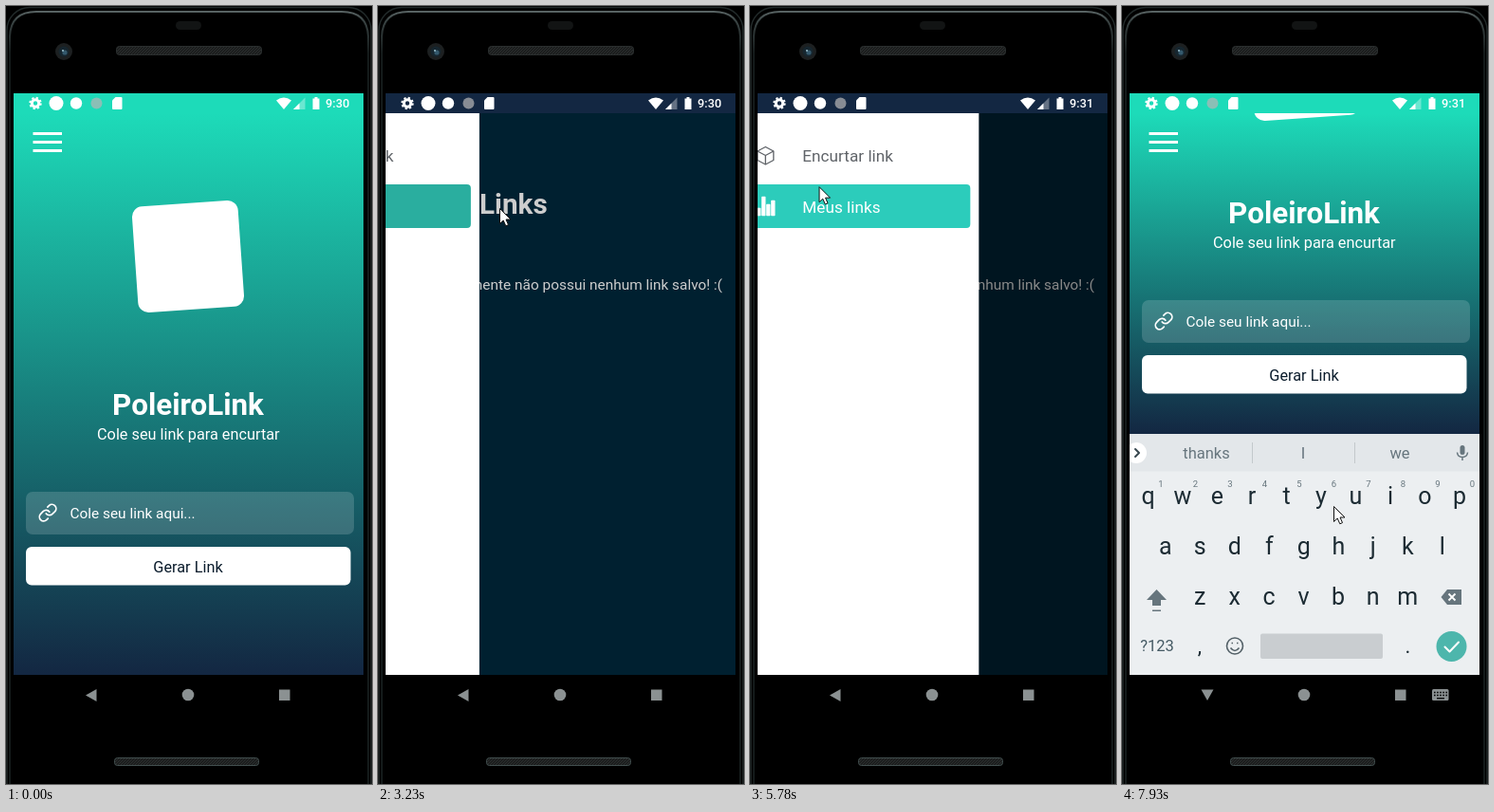
Recreate the animation shown at these times as an HTML page. Size 386 px wide and 820 px high, loop 8000 ms.

```html
<!DOCTYPE html>
<html lang="pt-BR">
<head>
<meta charset="utf-8">
<title>Encurtador de links</title>
<style>
  html, body { margin: 0; width: 100%; height: 100%; overflow: hidden; background: #000; }
  svg { display: block; font-family: Roboto, sans-serif; }
  .mid { text-anchor: middle; }
  .line { fill: none; stroke: #fff; stroke-width: 2; stroke-linecap: round; stroke-linejoin: round; }
  .item rect { fill: none; }
  .item text { font-size: 17.2px; fill: #5f6368; }
  .item path { fill: none; stroke: #5f6368; stroke-width: 1.3; stroke-linejoin: round; }
  .item.active rect { fill: #2cccbb; }
  .item.active.pressed rect { fill: #2aae9f; }
  .item.active text { fill: #fff; }
  .item.active path { fill: #fff; stroke: #fff; }
  #cubeEdges { fill: none !important; }
  .active #cubeEdges { stroke: #2cccbb; }
</style>
</head>
<body>
<svg width="386" height="820" viewBox="0 0 386 820">
  <defs>
    <linearGradient id="sky" gradientUnits="userSpaceOnUse" x1="0" y1="113" x2="0" y2="704">
      <stop stop-color="#1ddbb9"/><stop offset="1" stop-color="#132742"/>
    </linearGradient>
    <linearGradient id="rim" gradientUnits="userSpaceOnUse" x1="0" y1="0" x2="0" y2="50">
      <stop stop-color="#6b7676"/><stop offset=".3" stop-color="#3a4444"/><stop offset="1" stop-color="#141a1a"/>
    </linearGradient>
    <pattern id="mesh" width="3" height="3" patternUnits="userSpaceOnUse">
      <rect width="3" height="3" fill="#1b1d1d"/><path d="M0 3L3 0" stroke="#303434" stroke-width=".8"/>
    </pattern>
    <clipPath id="app"><rect x="8" y="113" width="369" height="592"/></clipPath>
  </defs>

  <!-- phone body -->
  <rect width="386" height="820"/>
  <rect x="1" y="1.500" width="384" height="860" rx="24" fill="none" stroke="#222a2a" stroke-width="1.500"/>
  <path d="M4 820V32Q5 6 32 6H354Q381 6 382 32V820" fill="none" stroke="url(#rim)" stroke-width="2"/>
  <rect x="179" y="16" width="27" height="9" rx="4.500" fill="#121414"/>
  <circle cx="61" cy="48" r="9" fill="#1d2021"/>
  <circle cx="61" cy="48" r="5.500" fill="#16262f"/>
  <circle cx="62" cy="49" r="2.600" fill="#34596d"/>
  <circle cx="60" cy="47" r="1" fill="#9ec4d2"/>
  <rect x="116.500" y="42.500" width="153" height="9" rx="3" fill="url(#mesh)" stroke="#2a2e2e"/>
  <rect x="114.500" y="792.500" width="152" height="8" rx="3" fill="url(#mesh)" stroke="#414e4e"/>

  <!-- status bar -->
  <rect id="status" x="8" y="92" width="369" height="21.500"/>
  <g fill="#fff">
    <circle cx="31" cy="102.500" r="3.700" fill="none" stroke="#fff" stroke-width="3"/>
    <circle cx="31" cy="102.500" r="5.600" fill="none" stroke="#fff" stroke-width="2.200" stroke-dasharray="2.200 2.200"/>
    <circle cx="53" cy="102.500" r="7.500"/>
    <circle cx="74" cy="102.500" r="6.200"/>
    <circle cx="95.500" cy="102.500" r="6" fill="#b4b4b4" opacity=".72"/>
    <path d="M115.500 96H121.500Q122.500 96 122.500 97V108Q122.500 109 121.500 109H113Q112 109 112 108V99.500Z"/>
    <path d="M293 109L285 99.500Q293 93.500 301 99.500Z"/>
    <path d="M303 109H315.500V96.500Z" opacity=".35"/>
    <path d="M303 109H309.500V102.500Z"/>
    <path d="M325.500 96H328.500V97.500H330.500V109H323.500V97.500H325.500Z"/>
    <text id="clock" x="337" y="107" font-size="12.800" font-weight="500"></text>
  </g>

  <g clip-path="url(#app)">
    <g id="home">
      <rect x="8" y="113" width="369" height="592" fill="url(#sky)"/>
      <g id="content">
        <rect id="badge" x="136" y="208" width="112" height="112" rx="11" fill="#fff" transform="rotate(-4 192 264)"/>
        <g class="mid" fill="#fff">
          <text x="192" y="431" font-size="31.400" font-weight="700">PoleiroLink</text>
          <text x="192.300" y="457" font-size="16.300">Cole seu link para encurtar</text>
        </g>
        <rect x="21" y="512" width="346" height="45" rx="7" fill="#fff" fill-opacity=".16"/>
        <path class="line" transform="translate(33.500 523.500) scale(.88)" d="M10 13a5 5 0 0 0 7.540.540l3-3a5 5 0 0 0-7.070-7.070l-1.720 1.710M14 11a5 5 0 0 0-7.540-.540l-3 3a5 5 0 0 0 7.070 7.070l1.710-1.710"/>
        <text x="67.500" y="540" font-size="15.400" fill="#fff">Cole seu link aqui...</text>
        <rect x="21" y="570" width="342.500" height="40.500" rx="6" fill="#fff"/>
        <text class="mid" x="192" y="597" font-size="16.300" fill="#0b1c2c">Gerar Link</text>
      </g>
    </g>
    <g id="links" fill="#fff">
      <rect id="linksPage" x="8" y="113" width="369" height="592"/>
      <text x="25.700" y="219" font-size="29.700" font-weight="700">Meus Links</text>
      <text x="17.500" y="298.500" font-size="15.420">Você infelismente não possui nenhum link salvo! :(</text>
    </g>
    <path d="M28.500 134.500H59M28.500 143.500H59M28.500 152.500H59" stroke="#fff" stroke-width="2.800"/>
    <rect id="shade" x="8" y="113" width="369" height="592"/>
    <g id="drawer">
      <rect x="8" y="113" width="251" height="592" fill="#fff"/>
      <g class="item" id="itemHome">
        <rect x="17" y="135" width="233" height="46" rx="4"/>
        <path d="M34 148.500L42.500 153V162.500L34 167L25.500 162.500V153Z"/>
        <path id="cubeEdges" d="M25.500 153L34 157.500L42.500 153M34 157.500V167"/>
        <text x="73" y="164">Encurtar link</text>
      </g>
      <g class="item" id="itemLinks">
        <rect x="17" y="188" width="233" height="46" rx="4"/>
        <path d="M25.500 213.500H28.500V220.500H25.500ZM30.500 201.500H33.500V220.500H30.500ZM35.500 209.500H38.500V220.500H35.500ZM40.500 205.500H43.500V220.500H40.500Z"/>
        <text x="73" y="217.500">Meus links</text>
      </g>
    </g>
    <g id="keyboard" fill="#1c2b33">
      <rect x="8" y="451" width="369" height="254" fill="#eceff1"/>
      <rect x="8" y="451" width="369" height="39.500" fill="#e3e7ea"/>
      <circle cx="15" cy="471" r="11" fill="#fff"/>
      <path class="line" style="stroke:#37474f" d="M14 467L18 471L14 475"/>
      <path d="M137.500 460V482M245.500 460V482" stroke="#c3c9cc"/>
      <g fill="#66757d">
        <rect x="356.500" y="463" width="5" height="10" rx="2.500"/>
        <path d="M353.500 470.500Q354 475.500 359 475.500T364.500 470.500M359 475.500V479" fill="none" stroke="#66757d" stroke-width="1.500"/>
        <path d="M36.500 615L47 626H41V632H32V626H26ZM32 636.500H41V638H32Z"/>
        <path d="M343 615H358V631H343L336.500 623Z"/>
        <path d="M344.500 619.500L351.500 626.500M351.500 619.500L344.500 626.500" stroke="#fff" stroke-width="1.800"/>
        <g fill="none" stroke="#546168" stroke-width="1.600">
          <circle cx="119" cy="674.500" r="8.500"/>
          <path d="M114.500 676.500Q119 682.500 123.500 676.500M115.500 671.500H117M121 671.500H122.500"/>
        </g>
      </g>
      <rect x="146" y="661.500" width="129" height="26.500" rx="2" fill="#c9cdd0"/>
      <circle cx="347.500" cy="675" r="16" fill="#4db6ac"/>
      <path class="line" d="M340.500 675.500L345.500 680.500L355 670.500"/>
    </g>
  </g>

  <!-- navigation bar -->
  <g fill="#8b9192">
    <path id="back"/>
    <circle cx="192" cy="726" r="6.300"/>
    <rect x="288" y="720.500" width="11.500" height="11.500"/>
    <g id="switcher">
      <rect x="327" y="720" width="17.500" height="12" rx="1.500"/>
      <path d="M329 723.500H343M329 726.500H343" stroke="#000" stroke-width="1.500" stroke-dasharray="1.600 1.500"/>
      <path d="M332 729.700H340" stroke="#000" stroke-width="1.300"/>
    </g>
  </g>
  <path id="cursor" d="M.5.5V16.500L4.200 13L6.800 18.800L9.500 17.600L7 12H12Z" fill="#fff" stroke="#111" stroke-linejoin="round"/>
</svg>
<script>
const LOOP = 8000;
const SHOW_LINKS = 3119, SHOW_HOME = 6553, TICK = 4900;
const KEYS_START = 7590, KEYS_END = 7900, RESIZE = 7690;
const OMEGA = Math.sqrt(1000 / 3) / 1000; // spring: stiffness 1000, mass 3

// drawer: [time, open?]
const DRAWER = [[1762, 1], [SHOW_LINKS, 0], [5544, 1], [SHOW_HOME, 0]];

// pointer: [time, x, y]
const POINTER = [
  [60, 352, 830], [750, 247, 290], [1000, 247, 290], [1660, 44, 143], [1800, 44, 143],
  [2200, 124, 176], [3000, 128, 213], [3240, 128, 213], [3620, 257, 225],
  [4340, 94, 167], [5240, 52, 146], [5560, 48, 144], [5800, 73, 191],
  [6400, 97, 160], [6850, 97, 160], [7470, 229, 531], [7600, 223, 527]
];

const el = {};
document.querySelectorAll('[id]').forEach(node => el[node.id] = node);
const clamp = v => Math.min(1, Math.max(0, v));
const smooth = v => v * v * (3 - 2 * v);
const show = (node, on) => node.setAttribute('visibility', on ? 'visible' : 'hidden');
const move = (node, x, y) => node.setAttribute('transform', `translate(${x} ${y})`);

function label(str, x, y, size, fill = '#1c2b33') {
  const node = document.createElementNS('http://www.w3.org/2000/svg', 'text');
  Object.entries({ x, y, 'font-size': size, fill, class: 'mid' })
    .forEach(([name, value]) => node.setAttribute(name, value));
  node.textContent = str;
  el.keyboard.append(node);
}

['qwertyuiop', 'asdfghjkl', 'zxcvbnm'].forEach((row, r) =>
  [...row].forEach((key, i) => {
    const x = 27.5 + [0, 18.3, 54.6][r] + 36.5 * i;
    label(key, x, 525 + 53 * r, 25);
    if (!r) label((i + 1) % 10, x + 13.5, 507, 9.5, '#66757d');
  }));
['thanks', 'I', 'we'].forEach((word, i) => label(word, 89 + 102 * i, 477, 16.5, '#66757d'));
label('?123', 37, 680, 16.5, '#455a64');
label(',', 82, 682, 22);
label('.', 301.5, 682, 22);

// critically damped spring
function drawerAt(t) {
  const last = DRAWER.filter(step => step[0] <= t).pop();
  if (!last) return 0;
  const phase = OMEGA * (t - last[0]);
  const rest = (1 + phase) * Math.exp(-phase);
  return last[1] ? 1 - rest : rest;
}

function pointerAt(t) {
  const next = POINTER.findIndex(p => p[0] > t);
  if (next < 0) return POINTER[POINTER.length - 1].slice(1);
  const a = POINTER[Math.max(0, next - 1)], b = POINTER[next];
  const k = smooth(clamp((t - a[0]) / (b[0] - a[0])));
  return [a[1] + (b[1] - a[1]) * k, a[2] + (b[2] - a[2]) * k];
}

function draw(t) {
  const onLinks = t >= SHOW_LINKS && t < SHOW_HOME;
  show(el.home, !onLinks);
  show(el.links, onLinks);
  el.status.setAttribute('fill', onLinks ? '#132742' : '#1ddbb9');
  el.clock.textContent = t < TICK ? '9:30' : '9:31';
  el.badge.setAttribute('opacity', t < SHOW_HOME ? 1 : clamp((t - SHOW_HOME) / 380));

  const open = drawerAt(t);
  show(el.drawer, open > .002);
  move(el.drawer, -251 * (1 - open), 0);
  el.shade.setAttribute('opacity', open / 2);
  el.linksPage.setAttribute('fill', open > .1 ? '#00283c' : '#132742');
  const pressed = [SHOW_LINKS, SHOW_HOME].some(at => t >= at && t < at + 600);
  [[el.itemHome, !onLinks], [el.itemLinks, onLinks]].forEach(([item, active]) => {
    item.classList.toggle('active', active);
    item.classList.toggle('pressed', pressed);
  });

  const rise = clamp((t - KEYS_START) / (KEYS_END - KEYS_START));
  const resized = t >= RESIZE;
  show(el.keyboard, rise > 0);
  move(el.keyboard, 0, 254 * (1 - rise) ** 2);
  move(el.content, 0, resized ? -202 : 0);
  el.sky.setAttribute('y2', resized ? 451 : 704);
  show(el.switcher, rise > 0);
  el.back.setAttribute('d', rise > 0 ? 'M83.500 720.500H96.500L90 732Z' : 'M84 726.500L95.500 720V733Z');

  show(el.cursor, t >= 120);
  move(el.cursor, ...pointerAt(t));
}

const start = performance.now();
(function frame() {
  draw((performance.now() - start) % LOOP);
  requestAnimationFrame(frame);
})();
</script>
</body>
</html>
```
